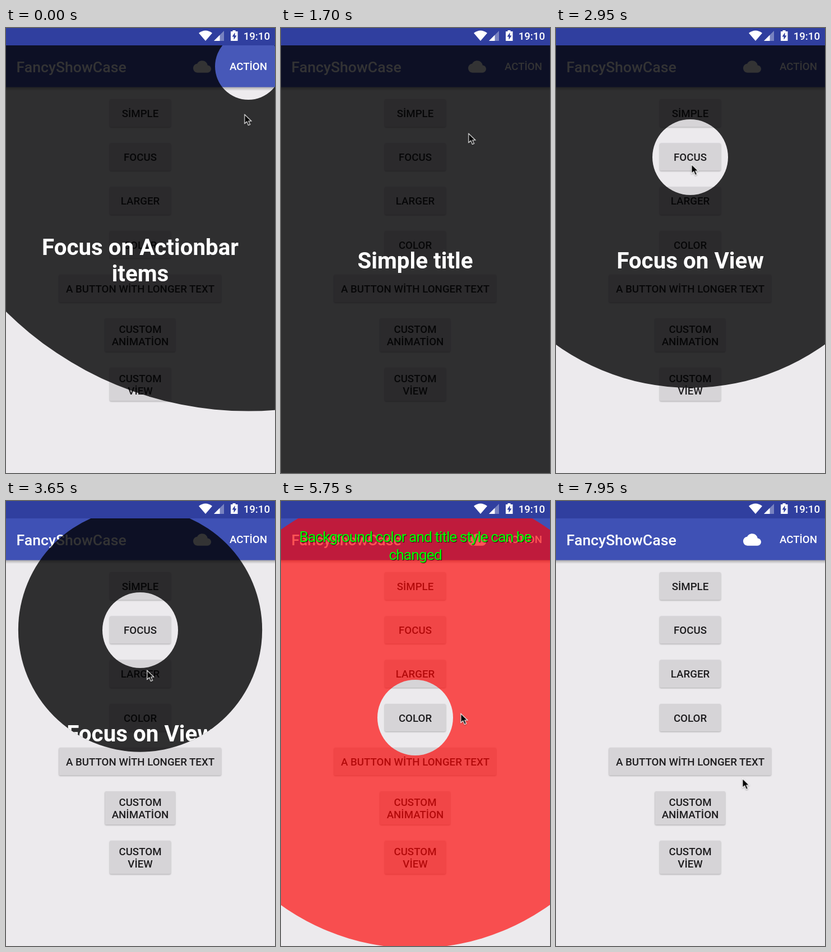
These frames come from a looping animation (480 px wide and 794 px high, 8 s). An HTML page:

```html
<!DOCTYPE html>
<html lang="en">
<head>
<meta charset="utf-8">
<title>Showcase demo</title>
<style>
  html, body { margin: 0; width: 100%; height: 100%; overflow: hidden; background: #eceaed; }
  #stage { position: relative; width: 480px; height: 794px; overflow: hidden; }
  svg { position: absolute; left: 0; top: 0; overflow: visible; }
  text { font-family: Roboto, "Noto Sans", sans-serif; font-weight: 500; }
  .label { font-size: 18.7px; fill: #1d1c1e; text-anchor: middle; }
  .bar { fill: #fff; }
  .btn { fill: #d6d4d7; filter: drop-shadow(0 1.4px 1px rgba(0, 0, 0, .28)); }
  #window { position: absolute; left: 0; top: 31px; width: 480px; height: 763px; overflow: hidden; }
  .case { position: absolute; left: 0; top: -31px; width: 480px; height: 794px; overflow: hidden; }
  .hole { position: absolute; }
  .title { font-size: 40.3px; font-weight: 700; fill: #fff; text-anchor: middle; }
  .title.green { font-size: 26.67px; font-weight: 400; fill: #0f0; letter-spacing: -1.13px;
    text-shadow: 1px 1px 1px rgba(0, 0, 0, .75); }
  #cursor { filter: drop-shadow(0 1px 1px rgba(0, 0, 0, .35)); }
</style>
</head>
<body>
<div id="stage">
  <svg id="app" width="480" height="794">
    <defs>
      <linearGradient id="shade" x2="0" y2="1">
        <stop offset="0" stop-color="#000" stop-opacity=".3"/>
        <stop offset="1" stop-color="#000" stop-opacity="0"/>
      </linearGradient>
    </defs>
    <rect width="480" height="794" fill="#eceaed"/>
    <rect y="105" width="480" height="7" fill="url(#shade)"/>
    <rect y="30" width="480" height="75.500" fill="#3f51b5"/>
    <rect width="480" height="31" fill="#303f9f"/>
    <g fill="#fff">
      <path d="M344 9Q356 0 368 9L356 23Z"/>
      <path d="M371 23L389 5V23Z" opacity=".35"/>
      <path d="M371 23L381.500 12.500V23Z"/>
      <path d="M404.500 4h5v2h4v17h-12.500v-17h3.500Z"/>
      <path transform="translate(334 53) scale(1.333)" d="M19.350 10.040C18.670 6.590 15.640 4 12 4 9.110 4 6.600 5.640 5.350 8.040 2.340 8.360 0 10.910 0 14c0 3.310 2.690 6 6 6h13c2.760 0 5-2.240 5-5 0-2.640-2.050-4.780-4.650-4.960z"/>
    </g>
    <path d="M408.500 8l-5 7.500h3v5.500l5-7.500h-3Z" fill="#303f9f"/>
    <text class="bar" x="471" y="21" font-size="18.670" text-anchor="end">19:10</text>
    <text class="bar" x="18.500" y="78.500" font-size="26.670">FancyShowCase</text>
    <text class="bar" x="432.500" y="75" font-size="18.670" text-anchor="middle">ACTİON</text>
  </svg>
  <div id="window"></div>
  <svg id="cursor" width="14" height="22">
    <path d="M.3 .3V16.500L4.200 13L7 19.500L10 18.200L7.300 12H12.300Z" fill="#000" stroke="#fff" stroke-width="1.100"/>
  </svg>
</div>
<script>
const LOOP = 8000, REVEAL = 400, FULL = Math.hypot(480, 764);
const SPEED_UP = 'cubic-bezier(.3333,0,.6667,0)';
const SLOW_DOWN = 'cubic-bezier(.3333,1,.6667,1)';
const DIM = 'rgba(1,0,2,.8)';
const $ = id => document.getElementById(id);

const text = (cls, x, y, s) => `<text class="${cls}" x="${x}" y="${y}">${s}</text>`;

// x, y, width, height, then each line with its baseline
const buttons = [
  [185, 127, 109, 49.5, ['SİMPLE', 159]],
  [185, 205.5, 109, 49, ['FOCUS', 237]],
  [185, 283.5, 109, 49.5, ['LARGER', 315.3]],
  [185, 362, 109, 49, ['COLOR', 393.5]],
  [94.5, 440, 289.5, 49.5, ['A BUTTON WİTH LONGER TEXT', 471.7]],
  [176.5, 518, 125.5, 59.5, ['CUSTOM', 544], ['ANİMATİON', 566]],
  [185, 606, 109, 59.5, ['CUSTOM', 632], ['VİEW', 654]]
];
$('app').insertAdjacentHTML('beforeend', buttons.map(([x, y, w, h, ...lines]) =>
  `<rect class="btn" x="${x}" y="${y}" width="${w}" height="${h}" rx="2.5"/>` +
  lines.map(([s, base]) => text('label', 239.5, base, s)).join('')).join(''));

// centre, half size and corner of the hole, opening and closing times, title lines
const cases = [
  { at: [432.5, 68], half: [59.5, 59.5], open: -351, close: 500, ripple: 'rgba(255,255,255,.04)',
    lines: [['Focus on Actionbar', 405], ['items', 452]] },
  { at: [240, 414], half: [0, 0], open: 1375, close: 1850,
    lines: [['Simple title', 429]] },
  { at: [239.5, 230], half: [67.5, 67.5], open: 2643, close: 3500,
    lines: [['Focus on View', 429]] },
  { at: [239.5, 308], half: [101, 101], open: 4130, close: 4700,
    lines: [['Focus on View with', 723], ['larger circle', 770]] },
  { at: [239.5, 386], half: [67.5, 67.5], open: 5443, close: 6450,
    color: 'rgba(255,0,0,.667)', style: 'title green',
    lines: [['Background color and title style can be', 73], ['changed', 104.5]] },
  { at: [239.5, 465], half: [150, 33], corner: 20, open: 6870, close: 7670,
    lines: [['Focus on larger view', 429]] }
];

function loop(el, frames) {
  const last = frames[frames.length - 1];
  const steps = frames.map(({ t, ...f }) => ({ ...f, offset: t / LOOP }));
  if (last.t < LOOP) {
    const { t, ...end } = last;
    steps.push({ ...end, offset: 1 });
  }
  const anim = el.animate(steps, { duration: LOOP, iterations: Infinity });
  anim.startTime = document.timeline.currentTime;
}

function addCase({ at: [x, y], half: [w, h], corner = w, open, close, lines,
                   color = DIM, ripple = 'none', style = 'title' }) {
  const el = document.createElement('div');
  el.className = 'case';
  el.innerHTML =
    `<div class="hole" style="left:${x - w}px;top:${y - h}px;width:${2 * w}px;height:${2 * h}px;` +
    `border-radius:${corner}px;background:${ripple};box-shadow:0 0 0 1000px ${color}"></div>` +
    `<svg width="480" height="794">${lines.map(([s, base]) => text(style, 239.5, base, s)).join('')}</svg>`;
  $('window').append(el);

  const ring = (t, r, easing = 'linear') => ({ t, clipPath: `circle(${r}px at ${x}px ${y}px)`, easing });
  const begun = FULL * (Math.max(0, -open) / REVEAL) ** 3;
  const start = open < 0 ? [ring(0, begun)] : [ring(0, 0), ring(open, 0, SPEED_UP)];
  loop(el, [...start, ring(open + REVEAL, FULL), ring(close, FULL, SLOW_DOWN),
    ring(Math.min(close + REVEAL, LOOP), 0)]);
}
cases.forEach(addCase);

// time, then the tip of the pointer
const path = [
  [0, 426, 154], [250, 416, 178], [550, 400, 192], [880, 370, 182], [1100, 252, 150],
  [1430, 252, 150], [1700, 335, 188], [2250, 336, 198], [2550, 244, 238], [2700, 243, 240],
  [2950, 242, 243], [3350, 252, 302], [4200, 252, 302], [4500, 392, 297], [5000, 374, 314],
  [5200, 258, 378], [5550, 258, 378], [5750, 321, 379], [6350, 360, 446], [6700, 363, 459],
  [6950, 363, 459], [7350, 344, 490], [7950, 333, 495]
];
loop($('cursor'), path.map(([t, x, y]) => ({
  t, transform: `translate(${x - .5}px, ${y}px)`, easing: 'ease-in-out'
})));
</script>
</body>
</html>
```
